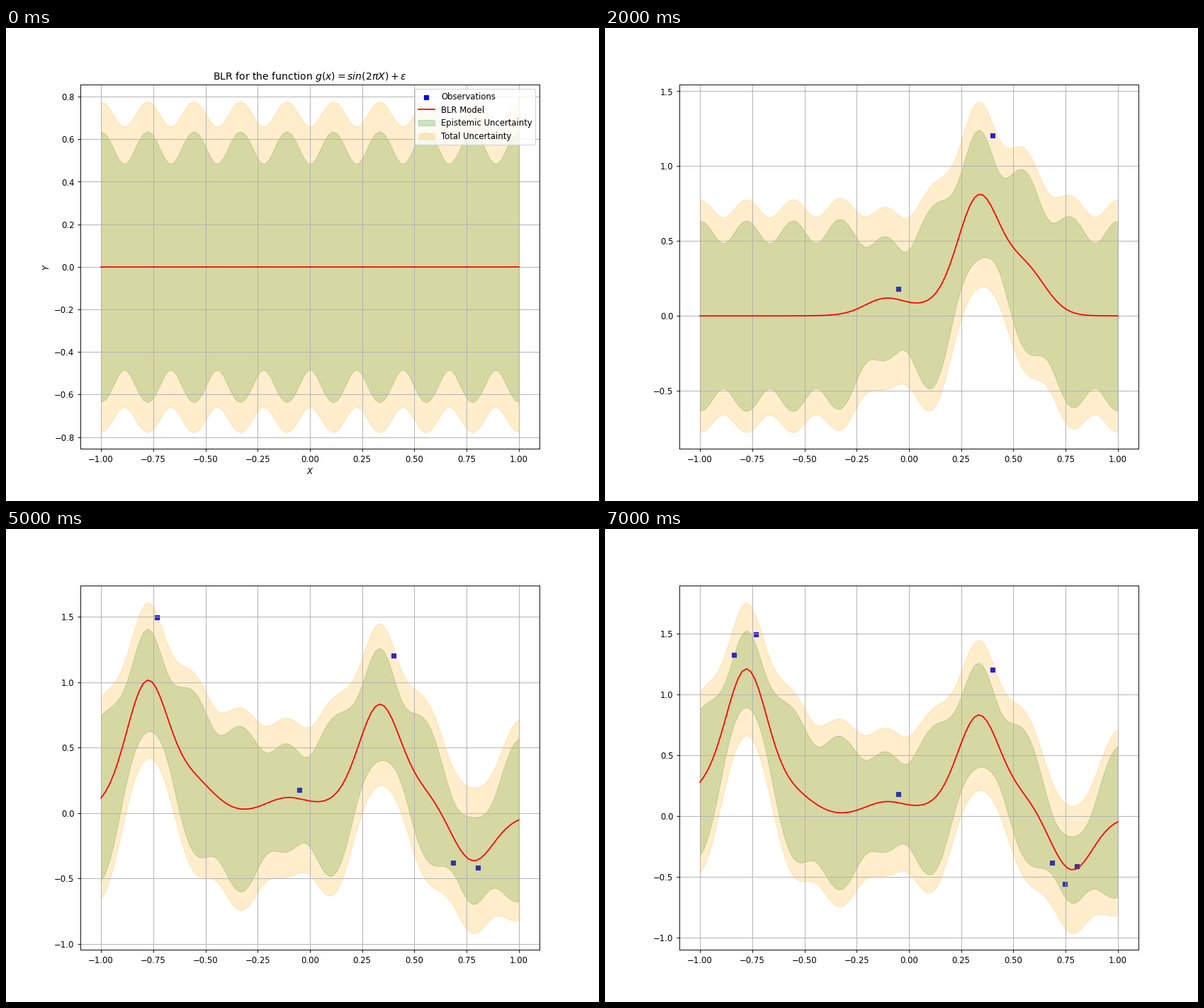
Recreate the animation shown at these times as a matplotlib script. Size 837 by 669 pixels, loop 8000 ms.

```python
import numpy as np
import matplotlib.pyplot as plt
from matplotlib.animation import FuncAnimation

W, H, DPI = 837, 669, 83.7

# Bayesian linear regression on ten Gaussian bumps
CENTRES = np.linspace(-1, 1, 10)
WIDTH = 0.1
PRIOR_VAR = 0.4
NOISE_VAR = 0.2

# observations in the order they arrive
OBS_X = np.array([0.402, -0.052, -0.733, 0.685, 0.805, 0.745, -0.838])
OBS_Y = np.array([1.206, 0.178, 1.498, -0.382, -0.416, -0.561, 1.328])

GRID_X = np.linspace(-1, 1, 100)


def features(x):
    return np.exp(-(x[:, None] - CENTRES) ** 2 / (2 * WIDTH ** 2))


def posterior(n):
    """Mean, epistemic and total deviation after n observations."""
    seen = features(OBS_X[:n])
    precision = np.eye(len(CENTRES)) / PRIOR_VAR + seen.T @ seen / NOISE_VAR
    cov = np.linalg.inv(precision)
    weights = cov @ seen.T @ OBS_Y[:n] / NOISE_VAR
    phi = features(GRID_X)
    var = np.sum(phi @ cov * phi, axis=1)
    return phi @ weights, np.sqrt(var), np.sqrt(var + NOISE_VAR)


# the small excess keeps the pixel size from rounding down
fig, ax = plt.subplots(figsize=((W + 0.01) / DPI, (H + 0.01) / DPI), dpi=DPI)


def band(mean, dev, color, label):
    ax.fill_between(GRID_X, mean - dev, mean + dev,
                    color=color, alpha=0.2, label=label)


def draw(n):
    ax.clear()
    mean, epistemic, total = posterior(n)
    ax.scatter(OBS_X[:n], OBS_Y[:n], s=20, marker="s", color="blue",
               label="Observations")
    ax.plot(GRID_X, mean, color="red", label="BLR Model")
    band(mean, epistemic, "green", "Epistemic Uncertainty")
    band(mean, total, "orange", "Total Uncertainty")
    ax.grid(True)
    if n == 0:
        ax.set_title(r"BLR for the function $g(x)=sin(2\pi X)+\varepsilon$")
        ax.set_xlabel("$X$")
        ax.set_ylabel("$Y$")
        ax.legend(loc="upper right")


anim = FuncAnimation(fig, draw, frames=len(OBS_X) + 1, interval=1000,
                     repeat=True)
plt.show()
```
